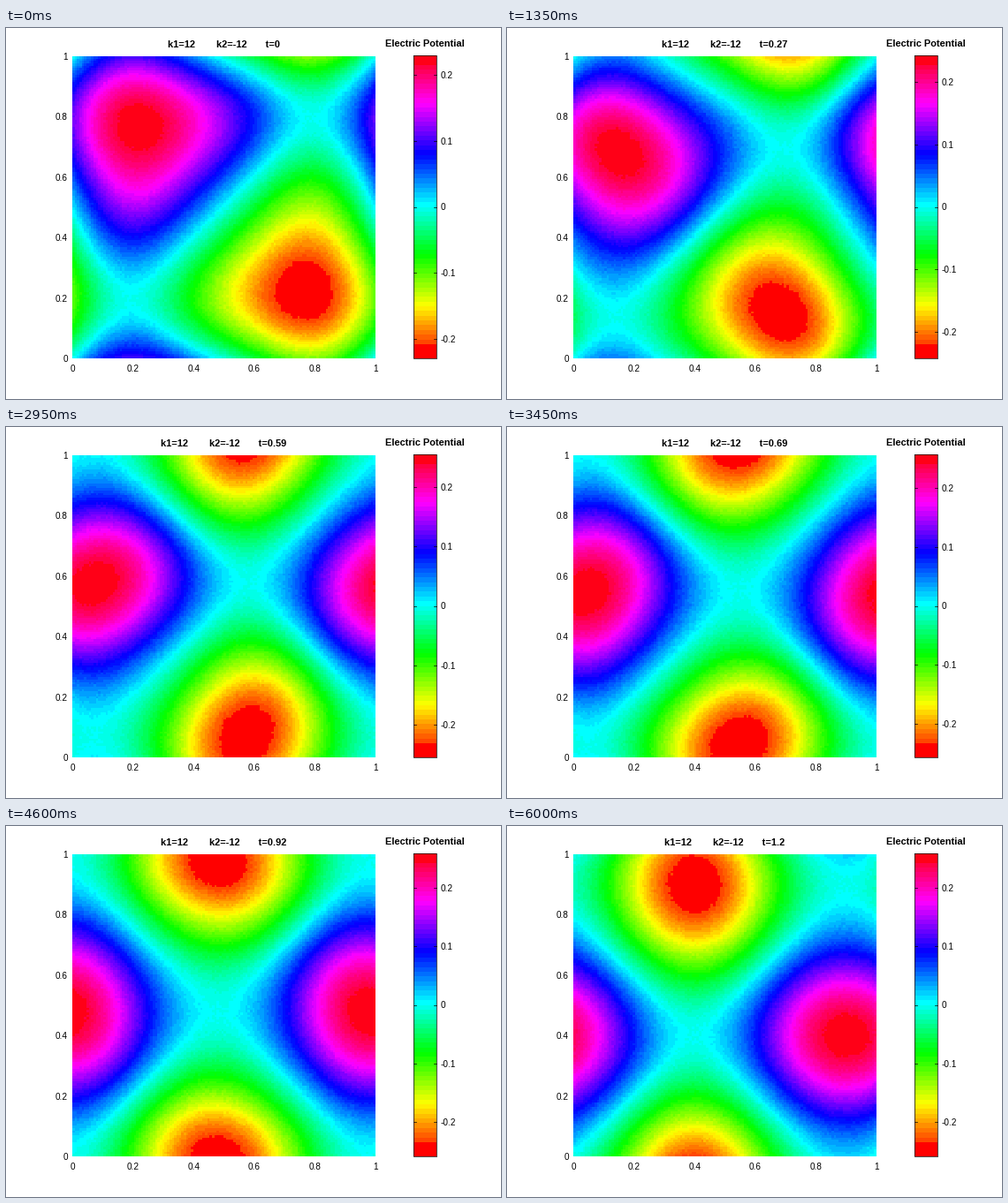
A matplotlib script for the animation above (6.05 s loop, 560 by 420 pixels).

```python
import numpy as np
import matplotlib.pyplot as plt
from matplotlib.animation import FuncAnimation
from matplotlib.colors import ListedColormap, hsv_to_rgb

W, H, DPI = 560, 420, 100
FRAMES, STEP, INTERVAL = 121, 0.01, 50
LEFT, RIGHT, TOP, BOTTOM = 75, 418, 32, 374
BAR_L, BAR_R, BAR_T, BAR_B = 461, 487, 31, 374
CELLS = 128
TAU = 2 * np.pi

plt.rcParams["font.family"] = "Liberation Sans"
plt.rcParams["axes.unicode_minus"] = False

# 64 hue steps, with the ends flattened to plain red
colors = hsv_to_rgb([(i / 64, 1, 1) for i in range(64)])
colors[:3] = colors[0]
colors[-2:] = colors[-1]
cmap = ListedColormap(colors)

fig = plt.figure(figsize=(W / DPI, H / DPI), dpi=DPI, facecolor="white")
stage = fig.add_axes([0, 0, 1, 1])
stage.set_xlim(0, W)
stage.set_ylim(H, 0)
stage.axis("off")

axis = (np.arange(CELLS) + 0.5) / CELLS
gx, gy = np.meshgrid(axis, axis)


def text(x, y, s, size=10, ha="center", weight="normal"):
    return stage.text(x, y, s, fontsize=size * 72 / DPI, ha=ha,
                      va="baseline", weight=weight, color="black")


def line(x, y):
    return stage.plot(x, y, color="black", lw=0.5, zorder=5)[0]


def image(data, left, right, bottom, top):
    return stage.imshow(data, cmap=cmap, vmin=-1, vmax=1, origin="lower",
                        extent=(left, right, bottom, top), aspect="auto",
                        interpolation="nearest", zorder=2)


def settle(t):
    """Remaining share of the starting shape."""
    return np.exp(-(t / 0.35) ** 1.6)


def amplitude(t):
    return 0.2585 - 0.0298 * settle(t)


def potential(t):
    """Periodic pair of opposite vortices drifting along the diagonal."""
    c = 0.494 - 0.287 * t
    x = TAU * (gx - c + 0.25)
    y = TAU * (gy - c - 0.25)
    s = settle(t)
    swell = t / 0.35 * np.exp(1 - t / 0.35)
    spin = 2 * np.radians(135 - 237 * (t - 0.27))
    a = 0.1125 * s + 0.1225 * (1 - s)

    f = a * (np.cos(x) + np.cos(y))
    f -= 0.0109 * s * np.sin(y - x)
    f += 0.0147 * s * (np.sin(2 * y) - np.sin(2 * x))
    f += 0.006 * (1 - s) * (np.cos(2 * x) * np.cos(y) + np.cos(x) * np.cos(2 * y))
    # rotating elliptical stretch of both vortices
    f += 0.009 * swell * np.cos(spin) * (np.cos(2 * x) - np.cos(2 * y))
    f += 0.010 * swell * np.sin(spin) * (np.sin(2 * x) * np.sin(y)
                                         + np.sin(x) * np.sin(2 * y))
    return f / np.abs(f).max()


field = image(np.zeros((CELLS, CELLS)), LEFT, RIGHT, BOTTOM, TOP)
image(np.linspace(-1, 1, 64)[:, None], BAR_L, BAR_R, BAR_B, BAR_T)
line([BAR_L, BAR_R, BAR_R, BAR_L, BAR_L], [BAR_T, BAR_T, BAR_B, BAR_B, BAR_T])
stage.set_xlim(0, W)
stage.set_ylim(H, 0)

for v in np.arange(6) / 5:
    text(LEFT + v * (RIGHT - LEFT), 389, f"{v:g}")
    text(70, BOTTOM - v * (BOTTOM - TOP) + 4, f"{v:g}", ha="right")

text(473.5, 21, "Electric Potential", 11, weight="bold")
title = text(246.5, 22, "", 11, weight="bold")

bar_ticks = []
for v in (-0.2, -0.1, 0, 0.1, 0.2):
    marks = [line([BAR_L, BAR_L + 3], [0, 0]), line([BAR_R - 3, BAR_R], [0, 0])]
    bar_ticks.append((v, marks, text(492, 0, f"{v:g}", ha="left")))


def update(i):
    t = i * STEP
    noise = np.random.default_rng(i).normal(0, 0.006, (CELLS, CELLS))
    field.set_data(np.clip(potential(t) + noise, -1, 1))
    title.set_text("k1=12" + " " * 8 + "k2=-12" + " " * 7 + f"t={t:g}")
    mid, half = (BAR_T + BAR_B) / 2, (BAR_B - BAR_T) / 2
    for v, marks, label in bar_ticks:
        y = mid - v / amplitude(t) * half
        for mark in marks:
            mark.set_ydata([y, y])
        label.set_y(y + 4)
    return []


anim = FuncAnimation(fig, update, frames=FRAMES, interval=INTERVAL,
                     repeat=True, repeat_delay=0, blit=False)
plt.show()
```
